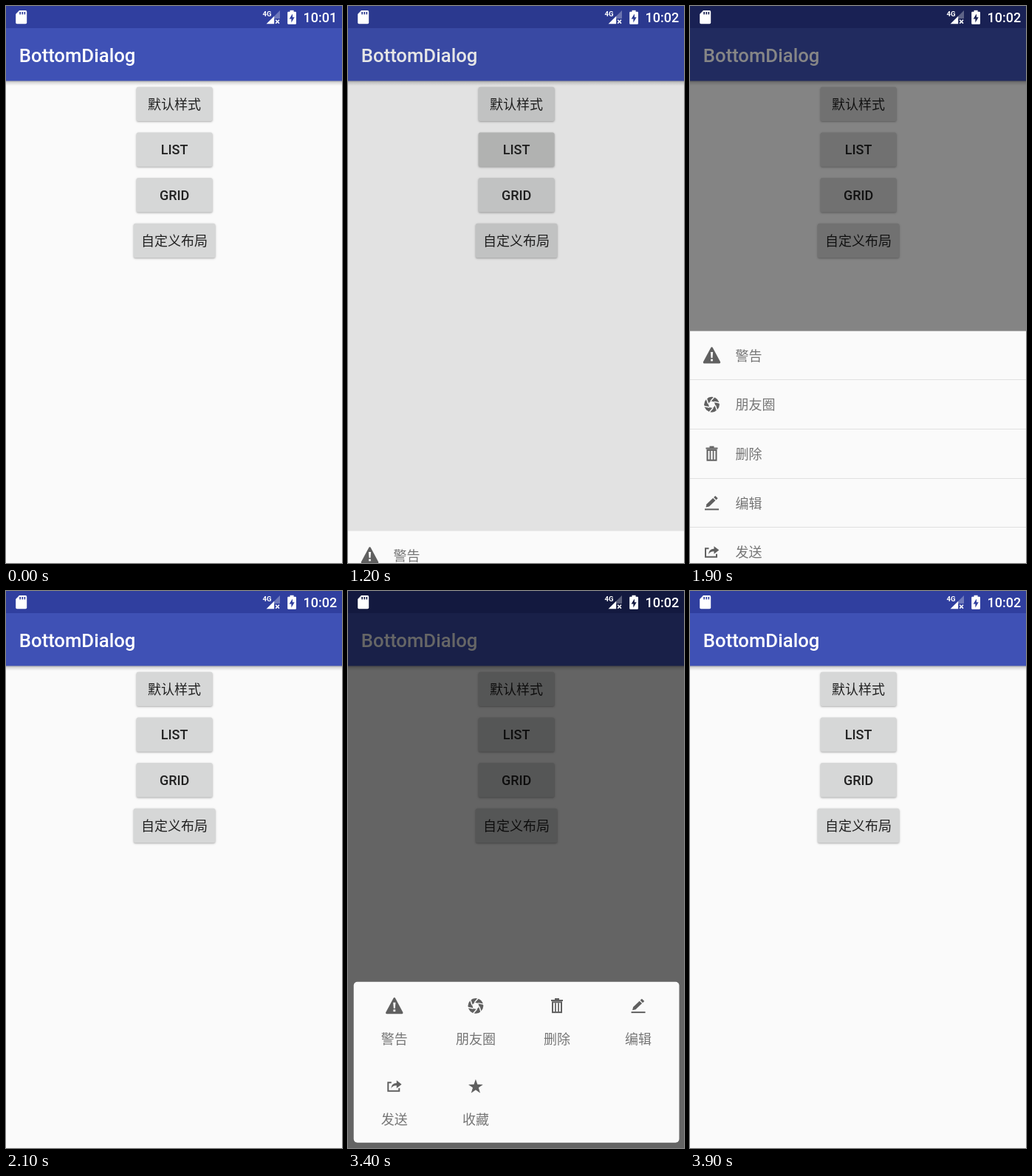
An HTML page with a canvas that plays this animation: 455 by 755 pixels, repeating every 5 s.

```html
<!DOCTYPE html>
<html lang="zh-CN">
<head>
<meta charset="utf-8">
<title>BottomDialog</title>
<style>
html, body { margin: 0; width: 100%; height: 100%; overflow: hidden; background: #fafafa; }
canvas { display: block; }
</style>
</head>
<body>
<canvas id="stage" width="455" height="755"></canvas>
<script>
const W = 455, H = 755, LOOP = 5000, STEP = 100;
const ctx = document.getElementById('stage').getContext('2d');
const FONT = 'Roboto, "Noto Sans CJK SC", "Noto Sans CJK", sans-serif';
const PAPER = '#fafafa', ICON = '#606060', LABEL = '#757575';

const buttons = [['默认样式', 102.8], ['LIST', 102.8], ['GRID', 102.8], ['自定义布局', 110.5]];
const items = [
  ['警告', warning], ['朋友圈', aperture], ['删除', trash],
  ['编辑', pencil], ['发送', share], ['收藏', star]
];

// Each dialog: opening time, closing time, pressed button, sheet painter and travel
const dialogs = [
  { open: 1200, close: 1900, press: 1000, button: 1, travel: 395, paint: listSheet },
  { open: 3100, close: 3700, press: 3000, button: 2, travel: 225, paint: gridSheet }
];

const clamp = x => Math.max(0, Math.min(1, x));
const ease = x => 0.5 - Math.cos(Math.PI * clamp(x)) / 2;

function rect(x, y, w, h, color) {
  ctx.fillStyle = color;
  ctx.fillRect(x, y, w, h);
}

function poly(points, color) {
  ctx.beginPath();
  points.forEach(([x, y]) => ctx.lineTo(x, y));
  ctx.closePath();
  ctx.fillStyle = color;
  ctx.fill();
}

function line(points, width, color) {
  ctx.beginPath();
  points.forEach(([x, y]) => ctx.lineTo(x, y));
  ctx.lineWidth = width;
  ctx.strokeStyle = color;
  ctx.stroke();
}

function round(x, y, w, h, r, color) {
  ctx.beginPath();
  ctx.roundRect(x, y, w, h, r);
  ctx.fillStyle = color;
  ctx.fill();
}

function text(str, x, y, size, weight, color, align = 'left') {
  ctx.font = `${weight} ${size}px ${FONT}`;
  ctx.textAlign = align;
  ctx.fillStyle = color;
  ctx.fillText(str, x, y);
}

function ring(n, r, turn = -Math.PI / 2) {
  return Array.from({ length: n }, (_, i) => {
    const a = turn + i * 2 * Math.PI / n, d = typeof r === 'number' ? r : r[i % r.length];
    return [d * Math.cos(a), d * Math.sin(a)];
  });
}

// Icons are drawn around the origin in a 24 px box
function warning() {
  const tri = [[0, -9.7], [10.2, 9.4], [-10.2, 9.4]];
  ctx.lineJoin = 'round';
  poly(tri, ICON);
  line([...tri, tri[0], tri[1]], 3, ICON);
  ctx.lineJoin = 'miter';
  poly([[-1.6, -4.5], [1.6, -4.5], [1, 3.5], [-1, 3.5]], PAPER);
  rect(-1.4, 5, 2.8, 2.8, PAPER);
}

function aperture() {
  ctx.beginPath();
  ctx.arc(0, 0, 10.4, 0, 2 * Math.PI);
  ctx.fillStyle = ICON;
  ctx.fill();
  const hex = ring(6, 4.9, 0.2);
  poly(hex, PAPER);
  hex.forEach(([x, y], i) => {
    const a = 0.2 + (i + 1) * Math.PI / 3;
    line([[x, y], [x + 10 * Math.cos(a), y + 10 * Math.sin(a)]], 1.5, PAPER);
  });
}

function trash() {
  rect(-8, -8.3, 16, 2, ICON);
  rect(-3, -10.3, 6, 2.2, ICON);
  ctx.lineWidth = 2;
  ctx.strokeStyle = ICON;
  ctx.strokeRect(-6, -5, 12, 13.8);
  rect(-2.9, -4, 1.7, 12, ICON);
  rect(1.2, -4, 1.7, 12, ICON);
}

function pencil() {
  poly([[-8, 6], [-7, 1.6], [1.6, -6.6], [5, -3.2], [-3.6, 5]], ICON);
  poly([[2.6, -7.5], [4.8, -9.5], [8.2, -6.2], [6, -4.1]], ICON);
  rect(-9.5, 7.8, 19, 2, ICON);
}

function share() {
  line([[-4, -5], [-8.5, -5], [-8.5, 6.5], [6.5, 6.5], [6.5, 2.5]], 2, ICON);
  ctx.beginPath();
  ctx.moveTo(-4.5, 3.2);
  ctx.quadraticCurveTo(-4, -4.4, 3, -4.4);
  ctx.lineTo(3, -8);
  ctx.lineTo(9.8, -2.6);
  ctx.lineTo(3, 2.6);
  ctx.lineTo(3, -1);
  ctx.quadraticCurveTo(-2.2, -1.2, -4.5, 3.2);
  ctx.fillStyle = ICON;
  ctx.fill();
}

function star() {
  ctx.save();
  ctx.translate(0, 0.8);
  poly(ring(10, [10.4, 4.1]), ICON);
  ctx.restore();
}

function icon(draw, x, y) {
  ctx.save();
  ctx.translate(x, y);
  draw();
  ctx.restore();
}

function listSheet() {
  const top = 359.6, row = 66.65;
  rect(0, top, W, H, PAPER);
  items.forEach(([name, draw], i) => {
    const y = top + row * i + 33;
    if (i) rect(0, Math.round(top + row * i - 0.8), W, 1, '#e0e0e0');
    icon(draw, 29.5, y);
    text(name, 61.5, y + 7, 18, 400, LABEL);
  });
}

function gridSheet() {
  round(7.7, 529.8, 440.8, 218, 5, PAPER);
  items.forEach(([name, draw], i) => {
    const x = 62.8 + 110.1 * (i % 4), y = 562.3 + 109 * Math.floor(i / 4);
    icon(draw, x, y);
    text(name, x, y + 51.3, 18, 400, LABEL, 'center');
  });
}

function button(i, state) {
  const [name, w] = buttons[i], x = 228.1 - w / 2, y = 109.7 + 61.7 * i;
  ctx.save();
  ctx.shadowColor = state === 'raised' ? 'rgba(0,0,0,.4)' : 'rgba(0,0,0,.32)';
  ctx.shadowBlur = state === 'raised' ? 7 : 2.5;
  ctx.shadowOffsetY = state === 'raised' ? 2 : 1;
  round(x, y, w, 46.4, 2.5, { raised: '#d2d2d2', held: '#c4c5c4' }[state] || '#d6d7d7');
  ctx.restore();
  text(name, 228.1, y + 29.8, 18, /[A-Z]/.test(name) ? 500 : 400, '#212121', 'center');
}

function page(states) {
  rect(0, 0, W, H, PAPER);
  buttons.forEach((_, i) => button(i, states[i]));
  const shade = ctx.createLinearGradient(0, 101, 0, 108);
  shade.addColorStop(0, 'rgba(0,0,0,.34)');
  shade.addColorStop(0.4, 'rgba(0,0,0,.13)');
  shade.addColorStop(1, 'rgba(0,0,0,0)');
  rect(0, 101, W, 7, shade);
  rect(0, 0, W, 101.5, '#3f51b5');
  rect(0, 0, W, 30, '#303f9f');
  text('BottomDialog', 17.8, 76, 25.7, 500, '#fff');
}

function statusIcons(time, dim) {
  const back = `rgb(${[48, 63, 159].map(c => Math.round(c * (1 - dim)))})`;
  // memory card
  ctx.beginPath();
  ctx.moveTo(18, 6);
  ctx.lineTo(26.5, 6);
  ctx.quadraticCurveTo(28.2, 6, 28.2, 7.7);
  ctx.lineTo(28.2, 22.6);
  ctx.quadraticCurveTo(28.2, 24.3, 26.5, 24.3);
  ctx.lineTo(14.8, 24.3);
  ctx.quadraticCurveTo(13.2, 24.3, 13.2, 22.6);
  ctx.lineTo(13.2, 11);
  ctx.closePath();
  ctx.fillStyle = '#fff';
  ctx.fill();
  [18.3, 21.4, 24.5].forEach(x => rect(x, 8, 1.7, 3.4, back));
  // signal
  text('4G', 347.6, 14.2, 9.6, 700, '#fff');
  poly([[363, 14], [371, 6], [371, 17], [363, 17]], 'rgba(255,255,255,.3)');
  poly([[352.6, 24.3], [363.2, 13.7], [363.2, 24.3]], '#fff');
  line([[365.2, 18.8], [370, 23.6]], 1.6, '#fff');
  line([[370, 18.8], [365.2, 23.6]], 1.6, '#fff');
  // battery
  rect(384.6, 5.8, 5, 3, '#fff');
  round(381.2, 7.8, 11.8, 17, 1.2, '#fff');
  poly([[388, 10.5], [383.6, 17.6], [386.4, 17.6], [386.4, 22.5], [390.7, 15.3], [388, 15.3]], back);
  text(time, 402.6, 21.8, 18, 500, '#fff');
}

// Sheet position and dimming, both 0..1
function pose(d, t) {
  if (t < d.open || t >= d.close + 200) return null;
  if (t < d.close) {
    const x = (t - d.open) / 300;
    return { slide: ease(x + 0.214), dim: ease(x + 0.265) };
  }
  const out = ease((t - d.close) / 300 + 0.3);
  return { slide: 1 - out, dim: 1 - out };
}

function draw(t) {
  const states = {};
  let shown = null, p = null;
  for (const d of dialogs) {
    if (t >= d.press && t < d.open) states[d.button] = 'raised';
    else if (t >= d.open && t < d.open + STEP) states[d.button] = 'held';
    const now = pose(d, t);
    if (now) { shown = d; p = now; }
  }
  const dim = p ? 0.6 * p.dim : 0;
  page(states);
  if (shown) {
    rect(0, 0, W, H, `rgba(0,0,0,${dim})`);
    ctx.save();
    ctx.translate(0, Math.round(shown.travel * (1 - p.slide)));
    shown.paint();
    ctx.restore();
  }
  statusIcons(t < 600 ? '10:01' : '10:02', dim);
}

const start = performance.now();
function tick() {
  const t = (performance.now() - start) % LOOP;
  draw(Math.floor(t / STEP) * STEP);
  requestAnimationFrame(tick);
}
tick();
</script>
</body>
</html>
```
